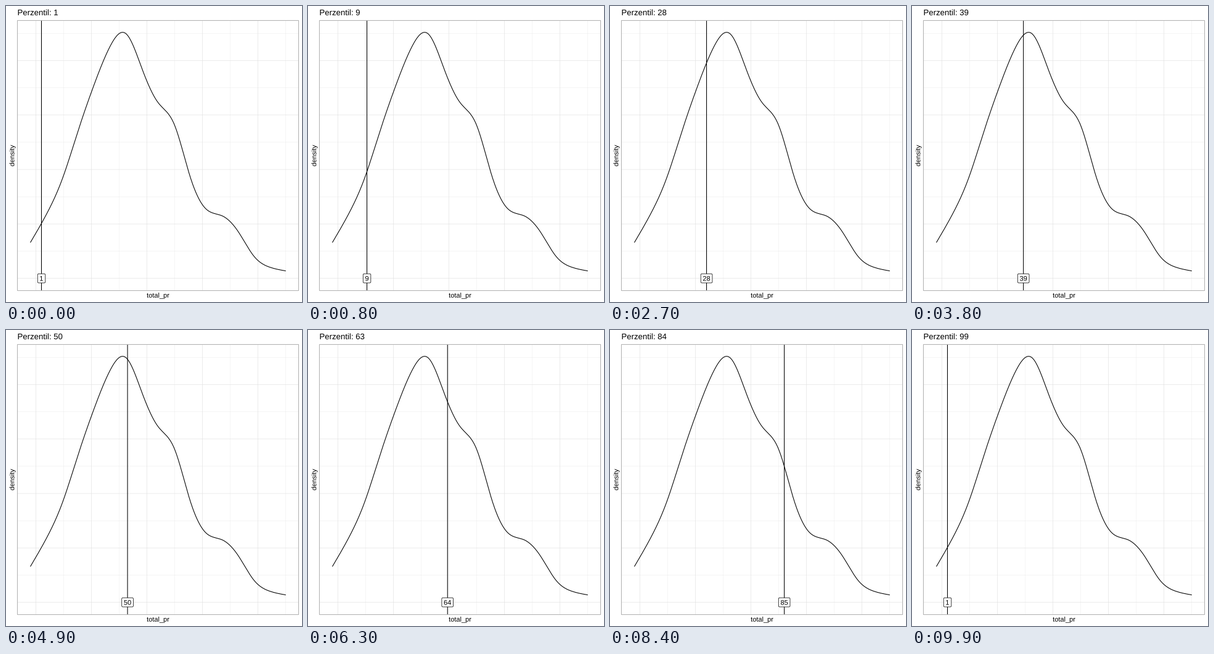
A matplotlib script that plays this animation: 480x480 px, repeating every 10 s.

```python
import numpy as np
import matplotlib.pyplot as plt
from matplotlib.animation import FuncAnimation
from matplotlib.patches import FancyBboxPatch, PathPatch, Rectangle
from matplotlib.textpath import TextPath
from matplotlib.transforms import Affine2D

SIZE, FRAMES, INTERVAL = 480, 100, 100
LEFT, RIGHT, TOP, BOTTOM = 18.5, 474.5, 23.5, 461.5
BASE = 441.6
GRID, BORDER = "#dedede", "#b3b3b3"

# Density heights at equal steps across the data range -1..45
HEIGHTS = [58, 103.5, 161, 240, 314.5, 376.5, 396.5, 339.5, 285,
           250.5, 165.5, 112.5, 101.5, 76.5, 36, 18, 12]

# Key points of the quantile curve: percentile, value
LEVELS = [(1, 1), (12, 7), (17, 9), (28, 12), (45, 16), (50, 16.5), (56, 17),
          (64, 19.62), (78, 24.47), (85, 26), (89, 29.7), (98, 40), (99, 45)]

plt.rcParams.update({"font.family": "Liberation Sans", "path.snap": False})


def x_px(value):
    return 48.5 + 9.005 * value


def spline(y, t):
    """Natural cubic spline through y at 0, 1, 2, ..."""
    y, n = np.asarray(y), len(y)
    m = np.zeros(n)
    tri = 4 * np.eye(n - 2) + np.eye(n - 2, k=1) + np.eye(n - 2, k=-1)
    m[1:-1] = np.linalg.solve(tri, 6 * np.diff(y, 2))
    i = np.clip(t.astype(int), 0, n - 2)
    b = t - i
    a = 1 - b
    return (a * y[i] + b * y[i + 1]
            + ((a**3 - a) * m[i] + (b**3 - b) * m[i + 1]) / 6)


def quantile(p):
    """Quantile of whole-number data: rests on integers, crosses quickly."""
    raw = np.interp(p, *zip(*LEVELS))
    whole = np.floor(raw)
    return whole + np.clip(2 * (raw - whole) - 0.5, 0, 1)


def text_path(text, x, y, size, center=True, angle=0):
    """Text outline on the baseline point (x, y), y pointing down."""
    path = TextPath((0, 0), text, size=size)
    box = path.get_extents()
    shift = -(box.x0 + box.x1) / 2 if center else 0
    place = Affine2D().translate(shift, 0).scale(1, -1)
    return place.rotate_deg(-angle).translate(x, y).transform_path(path)


def add_text(*args, **kwargs):
    patch = PathPatch(text_path(*args, **kwargs), fc="black", lw=0, zorder=7)
    return ax.add_patch(patch)


fig = plt.figure(figsize=(SIZE / 72, SIZE / 72), dpi=72, facecolor="white")
ax = fig.add_axes([0, 0, 1, 1])
ax.set(xlim=(0, SIZE), ylim=(SIZE, 0))
ax.axis("off")

for i in range(10):
    width = 0.3 if i % 2 else 0.55
    x, y = x_px(5 * i), BASE - 44.13 * i
    ax.plot([x, x], [TOP, BOTTOM], color=GRID, lw=width, zorder=1)
    ax.plot([LEFT, RIGHT], [y, y], color=GRID, lw=width, zorder=1)

t = np.linspace(0, len(HEIGHTS) - 1, 512)
ax.plot(x_px(np.linspace(-1, 45, 512)), BASE - spline(HEIGHTS, t),
        color="black", lw=1.07, solid_capstyle="butt", zorder=2)
ax.add_patch(Rectangle((LEFT, TOP), RIGHT - LEFT, BOTTOM - TOP, fill=False,
                       ec=BORDER, lw=1.07, zorder=6))

add_text("total_pr", 246.5, 472.8, 11)
add_text("density", 13.4, 242.5, 11, angle=90)
title = add_text("Perzentil: 1", LEFT, 15, 13.2, center=False)

line, = ax.plot([], [], color="black", lw=1.07, solid_capstyle="butt",
                zorder=3)
box = FancyBboxPatch((0, 0), 1, 1, boxstyle="round,pad=0,rounding_size=1.8",
                     fc="white", ec="black", lw=0.75, zorder=4)
ax.add_patch(box)
label = add_text("1", 0, BASE, 11.04)


def update(k):
    p = k % (FRAMES - 1) + 1
    x = x_px(quantile(p))
    count = round(1 + 98 * k / (FRAMES - 1))
    title.set_path(text_path(f"Perzentil: {count}", LEFT, 15, 13.2,
                             center=False))
    line.set_data([x, x], [TOP, BOTTOM])
    width = 6.14 * len(str(p)) + 6.4
    box.set_bounds(x - width / 2, BASE - 7.4, width, 14.8)
    label.set_path(text_path(str(p), x, BASE + 4, 11.04))
    return title, line, box, label


anim = FuncAnimation(fig, update, frames=FRAMES, interval=INTERVAL,
                     repeat=True, repeat_delay=0, blit=False)
plt.show()
```
